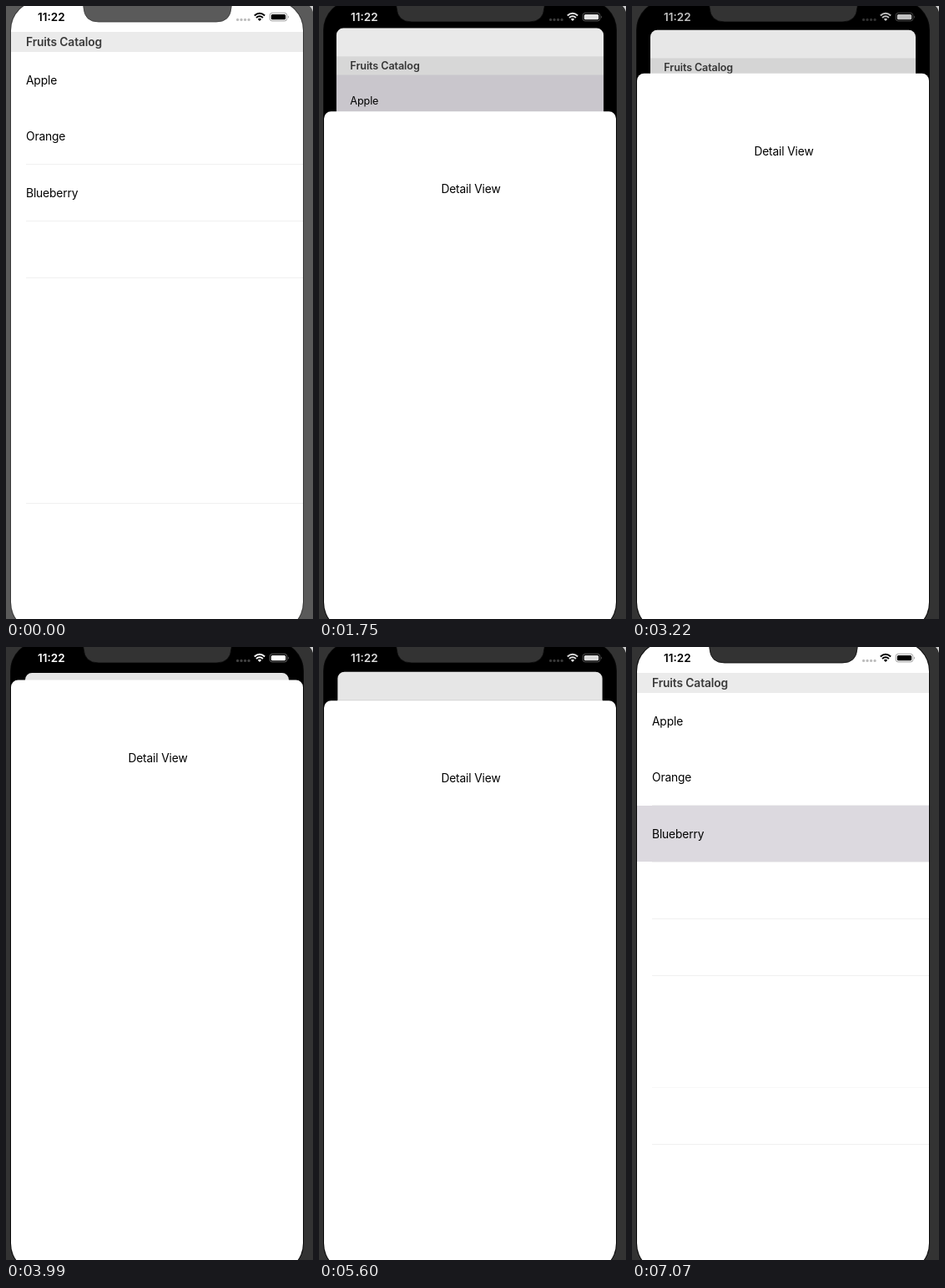
Write an HTML page that moves like this. It is 368 by 734 pixels and loops after 7.14 s.

```html
<!DOCTYPE html>
<html lang="en">
<head>
<meta charset="utf-8">
<title>Fruits Catalog</title>
<style>
  html, body { margin: 0; width: 100%; height: 100%; overflow: hidden; }
  #stage {
    --bezel: #333; --rim: #080808;
    position: relative; width: 368px; height: 734px; overflow: hidden;
    background: var(--bezel);
    font: 400 13.8px/1 Inter, Roboto, sans-serif; letter-spacing: -.15px; color: #000;
  }
  #stage.idle { --bezel: #5a5a5a; --rim: #383838; }
  #screen {
    position: absolute; left: 6px; top: -6px; width: 350px; height: 755px;
    border-radius: 35px; overflow: hidden; background: #000;
    box-shadow: 0 0 0 1px var(--rim);
  }
  #card, #sheet { position: absolute; left: 0; top: 0; width: 350px; height: 757px; background: #fff; overflow: hidden; }
  #card { transform-origin: 50% 0; }
  #sheet { border-radius: 8.5px 8.5px 0 0; }
  #sheet div { position: absolute; left: 1px; top: 85px; width: 100%; line-height: 16px; text-align: center; }
  .header, .row {
    position: absolute; left: 0; right: 0; padding: 2px 0 0 18px;
    box-sizing: border-box; display: flex; align-items: center;
  }
  .header { top: 37px; height: 24px; background: #ebebeb; color: #3a3a3a; font-weight: 600; letter-spacing: -.12px; }
  .row.on { background: #dcd9df; }
  .line { position: absolute; left: 18px; right: 0; height: 1px; background: #f0f0f0; }
  .faint { background: #f8f8f8; }
  .idle .late { display: none; }
  #dim { position: absolute; inset: 0; background: #000; }
  #overlay { position: absolute; left: 0; top: 0; }
  #overlay text { font: 600 13.5px Inter, Roboto, sans-serif; letter-spacing: 0; }
</style>
</head>
<body>
<div id="stage">
  <div id="screen">
    <div id="card">
      <div class="header">Fruits Catalog</div>
      <div id="dim"></div>
    </div>
    <div id="sheet"><div>Detail View</div></div>
  </div>
  <svg id="overlay" width="368" height="734">
    <path d="M364 0Q367 3 368 7V0Z" fill="#ccc"/>
    <path d="M92 -1Q93 0 93 2Q94 19 111 19H252Q269 19 270 2Q270 0 271 -1Z" style="fill:var(--bezel);stroke:var(--rim)" stroke-width=".8"/>
    <g id="status" fill="currentColor">
      <text x="38" y="18">11:22</text>
      <g opacity=".26">
        <circle cx="277.6" cy="16.4" r="1.6"/><circle cx="282.1" cy="16.4" r="1.6"/>
        <circle cx="286.6" cy="16.4" r="1.6"/><circle cx="291.1" cy="16.4" r="1.6"/>
      </g>
      <g fill="none" stroke="currentColor" stroke-width="2">
        <path d="M297.8 11.4Q304 6.2 310.2 11.4"/>
        <path d="M300 13.9Q304 10.6 308 13.9"/>
      </g>
      <path d="M301.8 15.7Q304 14 306.2 15.7L304 18Z"/>
      <rect x="316.2" y="8.3" width="20.6" height="9.6" rx="2.8" fill="none" stroke="currentColor" opacity=".36"/>
      <path d="M338 11.4Q340 13.1 338 14.8Z" opacity=".36"/>
      <rect x="317.8" y="9.9" width="17.4" height="6.4" rx="1.5"/>
    </g>
  </svg>
</div>
<script>
const LOOP = 7140, TICK = 70, FOCUS = 700;
const TRAVEL = 712, SHEET_TOP = 45.5;
const LIST_TOP = 61, PITCH = 67.6;

// One visit to the detail view per row, in ms.
const visits = [
  { name: 'Apple', select: 700, show: 782, hide: 1720 },
  { name: 'Orange', select: 2800, show: 2882, hide: 4380 },
  { name: 'Blueberry', select: 5110, show: 5216, hide: 6760 },
];

const $ = id => document.getElementById(id);
const stage = $('stage'), card = $('card'), sheet = $('sheet'), dim = $('dim'), status = $('status');

const rowTop = i => LIST_TOP + Math.floor(PITCH * i);

function add(className, top, text = '') {
  const el = document.createElement('div');
  el.className = className;
  el.style.top = top + 'px';
  el.textContent = text;
  card.insertBefore(el, dim);
  return el;
}

[2, 3, 4, 8].forEach(i => add('line', rowTop(i) - (i === 2)));
add('line late', rowTop(5));
add('line late faint', rowTop(7) - 1);
const rows = visits.map((v, i) => {
  const row = add('row', rowTop(i), v.name);
  row.style.height = rowTop(i + 1) - rowTop(i) + 'px';
  return row;
});

const clamp = x => Math.min(1, Math.max(0, x));
// Remaining distance of a critically damped spring.
const spring = (ms, rate) => ms <= 0 ? 1 : (1 + rate * ms / 1000) * Math.exp(-rate * ms / 1000);

function pose(v, t) {
  if (!v || t < v.show) return { open: 0, light: 0 };
  if (t < v.hide) {
    const open = 1 - spring(t - v.show, 13.5);
    return { open: open > .997 ? 1 : open, light: clamp((t - v.show) / 450) };
  }
  const open = spring(t - v.hide, 20);
  // The list has settled to the pixel once the sheet leaves the stage.
  return { open: open < .022 ? 0 : open, light: 1 - clamp((t - v.hide) / 280) };
}

function render(t) {
  const current = visits.filter(v => t >= v.select).pop();
  const { open, light } = pose(current, t);
  stage.classList.toggle('idle', t < FOCUS);
  rows.forEach((row, i) => row.classList.toggle('on', visits[i] === current));
  card.style.transform = open ? `translateY(${37 * open}px) scale(${1 - .097 * open})` : 'none';
  card.style.borderRadius = open ? '9px' : '0';
  dim.style.opacity = .1 * open;
  sheet.style.visibility = open ? 'visible' : 'hidden';
  sheet.style.transform = `translateY(${SHEET_TOP + TRAVEL * (1 - open)}px)`;
  const c = Math.round(255 * light);
  status.style.color = `rgb(${c},${c},${c})`;
}

const start = performance.now();
function frame() {
  const t = (performance.now() - start) % LOOP;
  render(Math.floor(t / TICK) * TICK);
  requestAnimationFrame(frame);
}
frame();
</script>
</body>
</html>
```
